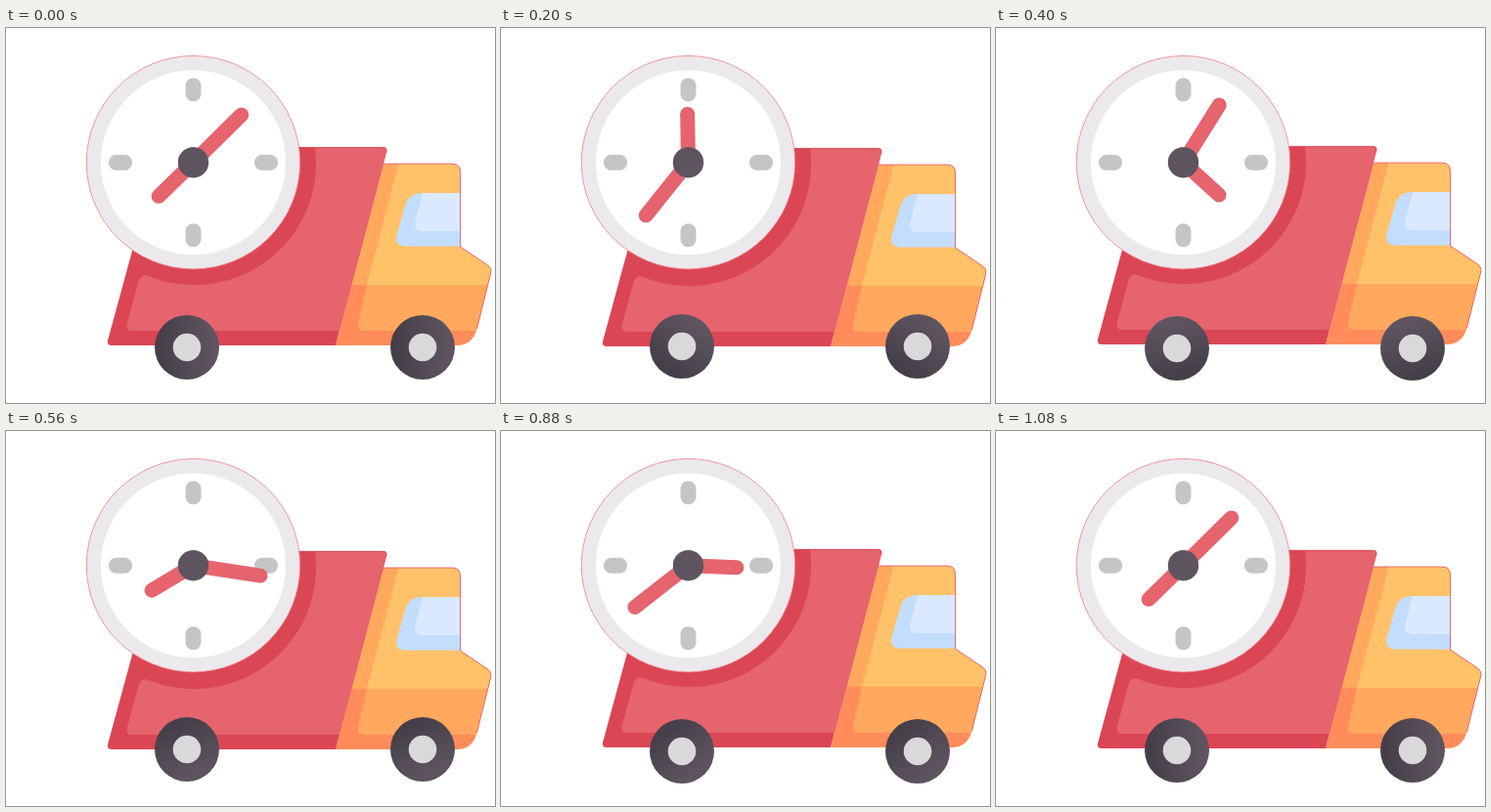
Recreate the animation shown at these times as an HTML page. Size 500 px wide and 384 px high, loop 1.1 s.

```html
<!DOCTYPE html>
<html lang="en">
<head>
<meta charset="utf-8">
<title>Express delivery</title>
<style>
  html, body { margin: 0; width: 100%; height: 100%; overflow: hidden; background: #fff; }
  svg { display: block; width: 500px; height: 384px; }
</style>
</head>
<body>
<svg viewBox="0 0 500 384">
  <defs>
    <linearGradient id="rubber">
      <stop offset="0.1" stop-color="#463f49"/>
      <stop offset="0.9" stop-color="#5d5460"/>
    </linearGradient>
    <clipPath id="cargoClip">
      <path id="cargo" d="M158 122H385Q390 122 389 127L337 325H108Q103 325 104 320Z"/>
    </clipPath>
    <clipPath id="cabClip">
      <path id="cab" d="M385.8 139H456Q464.5 139 464.5 147.500V224L492 242.500Q497 246 495.700 251L481.500 308Q477 325 461 325H337Z"/>
    </clipPath>
    <g id="wheel">
      <circle class="tire" r="33" fill="url(#rubber)"/>
      <circle r="14.3" fill="#dad8db"/>
    </g>
    <rect id="mark" x="-8" y="-86.500" width="16" height="24" rx="7.800" fill="#c6c5c6"/>
  </defs>

  <g id="body">
    <g clip-path="url(#cabClip)">
      <rect x="330" y="130" width="170" height="200" fill="#ff8c5a"/>
      <path d="M385.800 139H500V263H353.300Z" fill="#ffa85e"/>
      <path d="M401.500 139H500V263H369Z" fill="#ffc269"/>
      <path d="M369 263H500V310H366Q358.500 310 360.300 301Z" fill="#ffa85e"/>
      <path d="M465 169H426Q412 169 408.500 181L399.500 212Q397 223.500 409 223.500H465Z" fill="#c3ddff"/>
      <path d="M465 169H426L418.500 198Q416.500 208 426 208H465Z" fill="#dbe9ff"/>
    </g>
    <path d="M386 139H456Q464.500 139 464.500 147.500V224L492 242.500Q497 246 495.700 251L481.500 308" fill="none" stroke="#e5526a" stroke-width="0.8"/>
    <g clip-path="url(#cargoClip)">
      <rect x="100" y="118" width="292" height="210" fill="#db4655"/>
      <path d="M135 261Q137.500 252 144 253.600A125 125 0 0 0 316 122H392L341 310H129Q122 310 124 302Z" fill="#e5646e"/>
    </g>
    <path d="M300 122.300H385Q389.500 122.300 389 127" fill="none" stroke="#db4655" stroke-width="0.9"/>
  </g>

  <g id="wheels">
    <use href="#wheel" x="185" y="327"/>
    <use href="#wheel" x="426" y="327"/>
  </g>

  <g transform="translate(191.500 137.700)">
    <circle r="109.200" fill="#ece9ed" stroke="#ee7f88" stroke-width="0.8"/>
    <circle r="94.500" fill="#fff"/>
    <use href="#mark"/>
    <use href="#mark" transform="rotate(90)"/>
    <use href="#mark" transform="rotate(180)"/>
    <use href="#mark" transform="rotate(270)"/>
    <g stroke="#e5646e" stroke-width="15" stroke-linecap="round">
      <path id="hourHand" d="M0 0V-49.500"/>
      <path id="minuteHand" d="M0 0V-69.300"/>
    </g>
    <circle r="15.700" fill="#5d5460"/>
  </g>
</svg>
<script>
  const LOOP = 1100, STEP = 20, CYCLE = 54;
  const byId = id => document.getElementById(id);
  const [body, wheels, hourHand, minuteHand, rubber] =
    ["body", "wheels", "hourHand", "minuteHand", "rubber"].map(byId);

  const shift = (el, y) => el.setAttribute("transform", `translate(0 ${y.toFixed(2)})`);
  const turn = (el, deg) => el.setAttribute("transform", `rotate(${deg.toFixed(2)})`);

  function draw(time) {
    const p = Math.floor((time % LOOP) / STEP) / CYCLE;
    const bounce = 1.15 * Math.sin(p * 9 * 2 * Math.PI);
    // body and wheels shake against each other
    shift(body, -bounce);
    shift(wheels, bounce);
    turn(hourHand, 225.7 + 2 * 360 * p);
    turn(minuteHand, 45.3 + 8 * 360 * p);
    // the tire's shading is all that shows the wheel spin
    rubber.setAttribute("gradientTransform", `rotate(${(10 * 360 * p).toFixed(2)} 0.5 0.5)`);
  }

  function tick(time) {
    draw(time);
    requestAnimationFrame(tick);
  }

  draw(0);
  requestAnimationFrame(tick);
</script>
</body>
</html>
```
